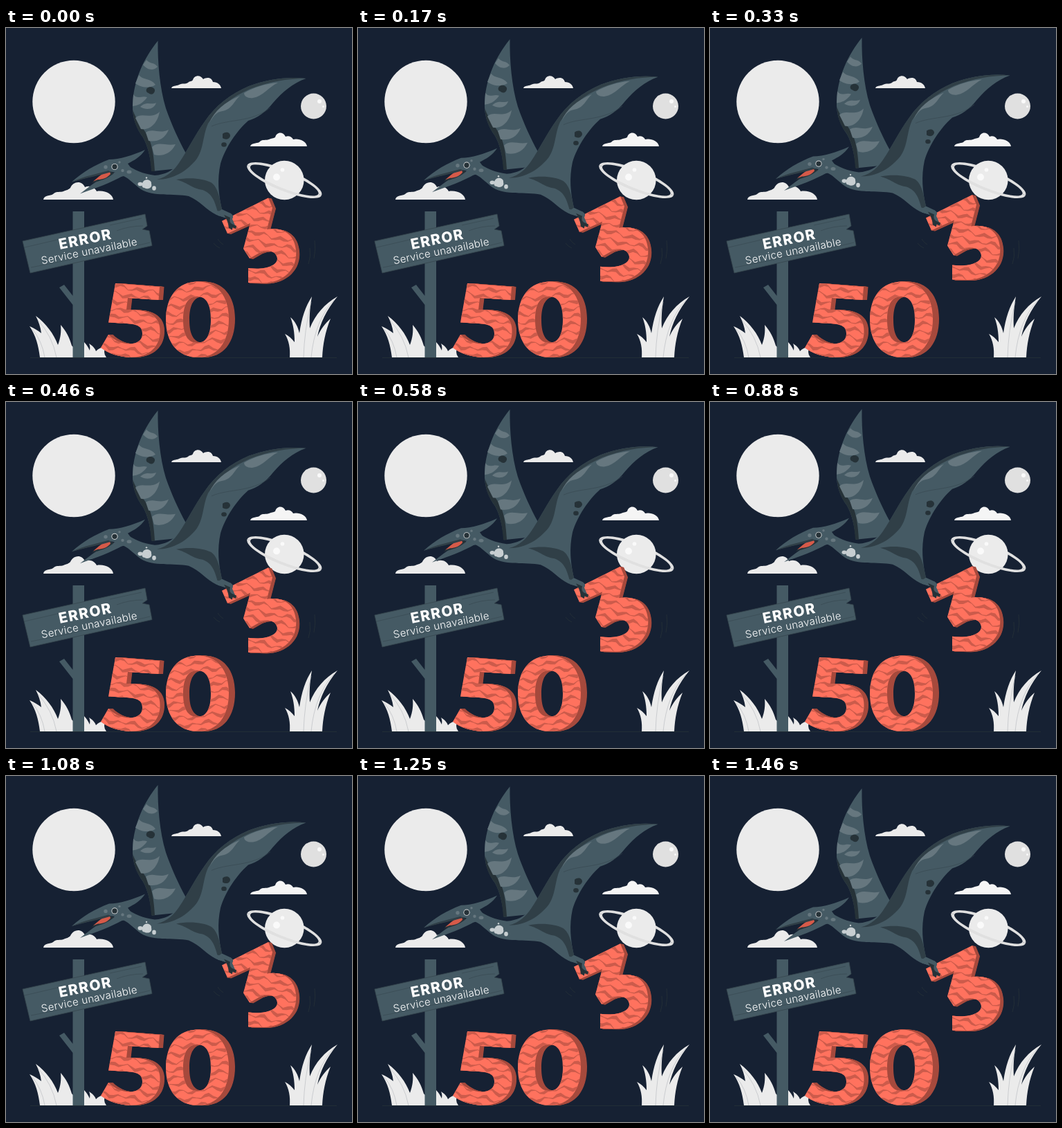
An HTML page for the animation above (1.5 s loop, 500 px wide and 500 px high).

```html
<!DOCTYPE html>
<html lang="en">
<head>
<meta charset="utf-8">
<title>Error 503</title>
<style>
  html, body { margin: 0; width: 100%; height: 100%; overflow: hidden; background: #162133; }
  svg { display: block; width: 100%; height: 100%; }
  text { font-family: Inter, "Open Sans", sans-serif; fill: #fff; text-anchor: middle; }
  .pale { fill: #ebebeb; }
  .gray { fill: #e0e0e0; }
  .shine { fill: #fafafa; }
  .slate { fill: #455a64; }
  .shade { fill: #303f47; }
  .dark { fill: #263238; }
  .patch { fill: #66777f; }
  .thin { fill: none; stroke: #37474f; stroke-width: .6; }
  .faint { fill: none; stroke: #263238; stroke-width: .8; }
  .blade { fill: none; stroke: #a8adb3; stroke-width: .5; }
</style>
</head>
<body>
<svg viewBox="0 0 500 500">
  <!-- sky -->
  <circle class="pale" cx="98" cy="106.500" r="59.700"/>
  <path class="pale" d="M239 87C240 83 246 84 250 82C255 79 259 82 263 79C266 76 268 78 270 75C272 68 281 67 285 74C290 71 297 71 299 78C306 78 310 82 311 87Z"/>
  <path fill="#f5f5f5" d="M353 171C354 166 362 167 366 165C370 160 376 163 380 161C384 159 386 160 389 158C391 150 400 149 404 157C408 155 413 157 415 161C422 159 434 163 435 171Z"/>
  <path class="pale" d="M54 248C55 241 64 243 68 240C73 235 79 238 83 236C88 234 90 234 93 231C97 221 110 220 114 230C121 227 128 230 131 236C143 234 154 240 155 248Z"/>
  <circle class="gray" cx="444.500" cy="113" r="18.500"/>
  <circle class="shine" cx="453" cy="106" r="3"/>
  <circle class="shine" cx="458.500" cy="113.500" r="1.500"/>
  <g transform="translate(402.300 220) rotate(22)">
    <path class="gray" d="M-58 0A58 15.500 0 0 1 58 0H53A53 11.500 0 0 0-53 0Z"/>
    <circle class="pale" r="28.300"/>
    <path class="gray" d="M-58 0A58 15.500 0 0 0 58 0H53A53 11.500 0 0 1-53 0Z"/>
  </g>
  <circle class="shine" cx="391" cy="215.500" r="5"/>
  <circle class="shine" cx="399.500" cy="205" r="2.800"/>

  <!-- ground -->
  <path class="faint" d="M35 476.500H478M300 311Q304 316 309 318M306 305Q309 310 314 313M437 341Q441 330 439 318M445 333Q448 320 446 307"/>
  <g class="pale">
    <path d="M49 476C47 459 43 444 34 431C41 434 46 437 51 441C50 432 47 424 43 416C58 427 69 442 75 458C79 448 80 438 79 429C87 438 92 448 95 459L112 476Z"/>
    <path d="M108 476L113 454C117 458 119 462 121 466Q122 460 120 456Q128 461 130 467Q135 461 145 461Q139 468 145 476Z"/>
    <path d="M410 476C411 463 409 452 403 442C409 445 413 449 417 454C417 440 415 428 411 418C418 424 422 432 424 441C427 419 433 402 442 388C439 405 438 420 439 434C447 414 460 399 479 388C463 407 454 427 450 446C455 435 461 427 469 420C461 440 458 457 457 476Z"/>
  </g>
  <path class="blade" d="M46 422Q67 445 73 476M38 435Q52 452 56 476M441 396Q431 437 430 476M474 393Q446 423 441 476"/>

  <!-- sign -->
  <path class="slate" d="M96.500 265H113V476H96.500V400L77 375L84 371L96.500 387Z"/>
  <path class="slate" stroke="#37474f" stroke-width=".8" d="M24 308L201 269L204 286L197 291L207 293L211 314.500L35 354Z"/>
  <path class="thin" d="M27 317L70 307Q82 303 94 302M150 285L196 275M36 346L92 335Q110 329 132 328L208 310M160 293Q178 286 198 286"/>
  <g transform="rotate(-11.500 118 319)">
    <text x="117.500" y="312" font-size="21" font-weight="800" letter-spacing="1.500">ERROR</text>
    <text x="119.500" y="328" font-size="15" font-weight="300" letter-spacing=".3">Service unavailable</text>
  </g>

  <g id="still"></g>
  <g id="flyer">
    <g id="cargo"></g>

    <!-- far wing -->
    <path class="slate" d="M219.500 18.500C199 44 185 74 183 109C182 132 190 147 198 158C206 172 209 190 211 207L250 203L260 181C250 163 239 139 231 116C222 86 219 49 219.500 18.500Z"/>
    <path class="dark" d="M183.500 119C188 133 199 145 206 158C212 172 214 189 215 207H210C209 190 206 172 198 158C190 147 184 136 183.500 119Z"/>
    <g class="patch">
      <path d="M203 46C207 52 214 49 219 56C213 63 203 60 198 53Z"/>
      <path d="M192 68C199 76 209 72 216 82C207 88 194 86 187 80Z"/>
      <path d="M184 96C190 104 196 97 204 100C197 110 190 112 183 113Z"/>
      <path d="M194 114C203 105 210 112 217 108C214 118 203 119 194 114Z"/>
      <path d="M187 130C196 121 209 133 222 121C218 142 204 148 195 146Z"/>
      <path d="M202 151C213 144 221 154 235 147C229 162 216 165 206 163Z"/>
      <path d="M211 172C220 163 231 171 245 168C238 183 223 186 214 183Z"/>
    </g>
    <path class="dark" d="M204 87C208 83 216 86 215 91C214 96 209 97 206 94C202 93 202 89 204 87Z"/>

    <!-- body and near wing -->
    <path class="slate" d="M174 197C184 205 199 211 215 213C230 212 240 206 248 198C262 178 272 156 288 134C302 113 325 95 351 84C378 74 407 70 433.500 73C414 80 400 92 386 108C375 122 363 130 350 134C333 149 317 173 310 196C305 219 307 240 312 262L325 268L322 276L304 270C289 263 281 250 264 243C242 239 213 244 195 233C184 225 176 215 165 212Z"/>
    <path class="shade" d="M218 219C234 215 243 205 250 195C263 176 273 154 288 134C302 113 325 95 351 84C378 74 407 70 433.500 73C407 73 379 78 353 88C327 99 306 116 292 138C284 156 286 175 275 190C262 206 243 219 218 219Z"/>
    <path class="shade" d="M246 219C267 215 286 218 296 223C304 228 308 239 312 262L306 266C302 251 298 239 284 234C269 232 264 224 246 219Z"/>
    <path class="thin" d="M297 142C322 131 355 137 382 115"/>
    <g class="patch">
      <path d="M294 137C301 120 316 107 338 98C330 105 326 118 313 120C304 121 299 128 294 137Z"/>
      <path d="M344 94C357 86 376 80 393 79C380 85 371 99 357 101C350 102 344 99 344 94Z"/>
    </g>
    <g class="dark">
      <path d="M313 153C318 149 324 151 324 156C323 161 317 162 313 159Z"/>
      <ellipse cx="315" cy="168.500" rx="3.800" ry="3.200"/>
    </g>

    <!-- leg -->
    <path class="slate" d="M305 264L325 268Q330 271 327 276L331 285L326 291L322 285L325 282L320 275L306 271Z"/>
    <path class="dark" d="M315 270L324 274Q322 279 326 283L333 286L332 290L327 288V292L322 289L321 283L319 277Z"/>

    <!-- head -->
    <path class="slate" d="M107 239.500C119 231 128 222 139 218L164 205L170 213C151 224 131 231 107 239.500Z"/>
    <path class="dark" d="M124 224C133 214 140 209 150 206L156 210C146 218 136 221 124 224Z"/>
    <path fill="#d65a49" d="M126 221.500C134 216 139 208 150 207.500L151 211C146 217 139 219 133 219Z"/>
    <path class="slate" d="M95 222.500C111 208 128 198 149 190C164 190 183 184 201 176C194 187 185 191 176 196L187 211L165 215L160 209L148 207C136 213 118 215 95 222.500Z"/>
    <path class="shade" d="M95 222.500C113 214 131 211 148 206L152 208C136 213 118 216 95 222.500Z"/>
    <g class="patch">
      <circle cx="144" cy="201" r="2.700"/><circle cx="168.500" cy="206" r="2.200"/>
      <circle cx="164" cy="194" r="1.700"/><ellipse cx="178" cy="208" rx="3.500" ry="2.500"/>
    </g>
    <circle cx="157" cy="200.500" r="4.600" fill="#d8dadb"/>
    <circle cx="157" cy="200.500" r="3.700" class="dark"/>
    <g fill="#c7ced1">
      <ellipse cx="194" cy="225.500" rx="3.500" ry="2.800"/>
      <path d="M199 221C203 217 211 220 210 225C212 231 205 234 200 231C195 231 196 224 199 221Z"/>
      <ellipse cx="214" cy="231.500" rx="2.800" ry="3.300"/>
      <circle cx="203" cy="216.500" r="1.200"/>
    </g>
  </g>
</svg>
<script>
  const $ = id => document.getElementById(id);
  const FLOAT_MS = 1500, RISE = 10;

  // Wavy bands, tapered at each crest, covering a box around (cx, cy).
  function bands(cx, cy) {
    let d = '';
    for (let row = -6; row <= 6; row++) {
      const top = [], bottom = [];
      for (let i = -12; i <= 12; i++) {
        const x = cx + i * 6;
        const y = cy + row * 11 + 2.4 * Math.sin(i * 1.7 + row * 2) + 1.5 * Math.sin(i * .8 + row);
        const w = 1.6 + 1.1 * Math.sin(i * 1.1 + row * 3);
        top.push(`${x} ${y - w}`);
        bottom.unshift(`${x} ${y + w}`);
      }
      d += `M${[...top, ...bottom].join('L')}Z`;
    }
    return d;
  }

  function digit(id, outline, [cx, cy], tilt, [dx, dy]) {
    const shape = (fill, move = '') =>
      `<path d="${outline}" fill="${fill}" fill-rule="evenodd" ${move}/>`;
    let side = '';
    for (let k = 12; k > 0; k--)
      side += shape('#a64a3d', `transform="translate(${dx * k / 12} ${dy * k / 12})"`);
    return `<clipPath id="${id}"><path d="${outline}" clip-rule="evenodd"/></clipPath>
      ${side}${shape('#ff725e')}
      <g clip-path="url(#${id})"><path d="${bands(cx, cy)}" fill="#cc5b4b"
        transform="rotate(${tilt} ${cx} ${cy})"/></g>`;
  }

  $('still').innerHTML =
    digit('five', 'M158 369L222 374L220.500 393L176 390L174 407L187 407.500C211 409 224 420 222.500 441C221 464 203 476 179 476C162 475 147 470 137 462L148 443C157 452 167 456 179 456.500C191 456 197 450 197 442C197 432 191 428 174 427L148 425.500Z',
      [181, 421], 10, [6.5, 0]) +
    digit('zero', 'M231 422C231 387 249 366.500 277 366.500C305 366.500 322 387 322 420C322 455 305 476 277 476C249 476 231 455 231 422ZM256 422C256 444 263 455 276.500 455C289 455 296 444 296 421C296 399 289 388 276.500 388C263 388 256 399 256 422Z',
      [277, 421], -6, [9, 0]);
  $('cargo').innerHTML =
    digit('three', 'M312 279L379 245.500L385 260L377 291C401 287 417 299 419 321C422 348 401 368 372 368.500L350 368V347C373 350 392 344 392 333C390 321 378 320 366 325L352 333L343 319L353 282L320 297Z',
      [370, 310], 12, [5, 1]);

  function draw() {
    const t = performance.now() % FLOAT_MS / FLOAT_MS;
    const lift = RISE * (1 - Math.abs(1 - 2 * t));
    $('flyer').setAttribute('transform', `translate(0 ${-lift})`);
    requestAnimationFrame(draw);
  }
  draw();
</script>
</body>
</html>
```
